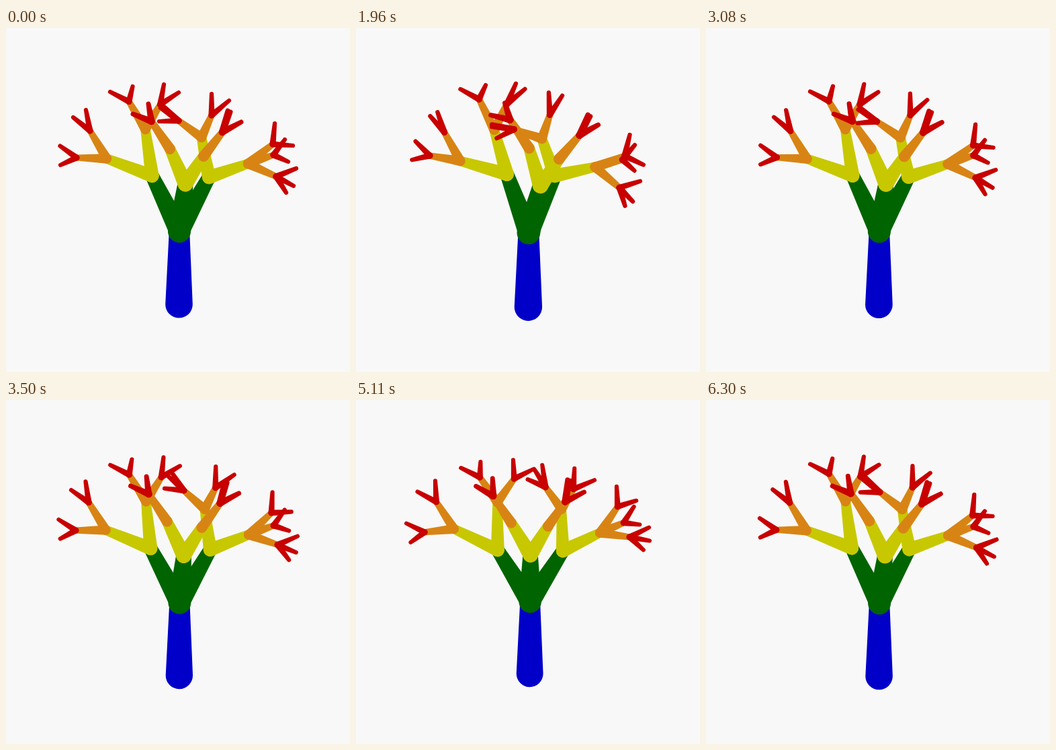
Recreate the animation shown at these times as an HTML page with a canvas. Size 512 by 512 pixels, loop 6.37 s.

```html
<!DOCTYPE html>
<html>
<head>
<meta charset="utf-8">
<style>
html, body { margin: 0; width: 100%; height: 100%; overflow: hidden; background: #f8f8f8; }
canvas { display: block; }
</style>
</head>
<body>
<canvas id="stage" width="512" height="512"></canvas>
<script>
const ctx = document.getElementById('stage').getContext('2d');
const STEP = 70, STEPS = 91;
const COLORS = ['#0000c8', '#006400', '#c8c800', '#d88414', '#c80000'];
const RADII = [20.3, 15.2, 10.2, 7.2, 4.6, 3.1];

// A branch tip at rest, how far it swings (degrees) and lengthens (ratio), and its children.
const tip = (x, y, swing, grow, ...kids) => ({ x, y, swing: swing * Math.PI / 180, grow, kids, bulk: 1 });

const left = tip(217.5, 220, 6.3, .012,
  tip(150, 194.5, -5.3, 0,
    tip(105, 193, 8.6, .025, tip(80.5, 175.5, 10.3, 0), tip(81, 204, 12.2, .03)),
    tip(125, 153, 2.2, .01, tip(100, 133, 10.7, 0), tip(119, 122, -8.4, 0))),
  tip(207.5, 151, -8.35, -.018,
    tip(183, 109.5, 4.6, .06, tip(155, 95, 1, 0), tip(188.5, 87, 12, 0)),
    tip(229.5, 114, -4.9, 0, tip(235, 84, 14, .09), tip(257, 96, -7, .06))));

const middle = tip(267, 232, 7.3, .02,
  tip(244, 180, 7.5, .024,
    tip(216.5, 139, 0, .03, tip(189, 128, -8.6, 0), tip(212, 113, -8, 0))),
  tip(294, 191, 1.8, -.018,
    tip(322, 155, 3.1, .025, tip(330, 123, 8.5, 0), tip(334, 125, 8.5, 0), tip(350, 140, -1, 0))));

const right = tip(302, 222, -4.3, .02,
  tip(291, 163, -9.3, -.033,
    tip(257, 138, -18.8, .04, tip(230, 119, 24 * -1, .03), tip(233, 115, -40, 0), tip(228, 139, -27, 0)),
    tip(306, 130, -6.5, .04, tip(306, 98, -3, .04), tip(332, 108, -18, 0))),
  tip(360, 202, 7.3, 0,
    tip(397, 173, 18.8, 0, tip(400, 142, 8.7, .04), tip(427, 175, 23, .03)),
    tip(398, 189, 4.3, .05, tip(415, 166, 4, 0), tip(420, 199, 19, 0)),
    tip(402, 221, 17.1, .035, tip(432, 209, 4.8, 0), tip(428, 235, 19, -.03), tip(417, 245, 16, 0))));

const crown = { x: 258, y: 302.5, kids: [left, middle, right], bulk: 1 };

// The middle limb leans towards the viewer and looks thicker.
(function thicken(node) {
  node.bulk = 1.12;
  node.kids.forEach(thicken);
})(middle);

function limb(a, b, level, scale) {
  const r0 = RADII[level] * scale, r1 = RADII[level + 1] * scale;
  const angle = Math.atan2(b.y - a.y, b.x - a.x);
  ctx.fillStyle = COLORS[level];
  ctx.beginPath();
  ctx.arc(a.x, a.y, r0, angle + Math.PI / 2, angle - Math.PI / 2);
  ctx.arc(b.x, b.y, r1, angle - Math.PI / 2, angle + Math.PI / 2);
  ctx.fill();
}

function draw(sway) {
  const zoom = 1 + .02 * sway;
  const base = { x: 257.5 - 1.2 * sway, y: 411.3 + 4.2 * sway };
  const top = { x: crown.x - 1.2 * sway, y: crown.y + 2.4 * sway };
  ctx.fillStyle = '#f8f8f8';
  ctx.fillRect(0, 0, 512, 512);
  limb(base, top, 0, zoom);

  // One level at a time, so thinner branches always lie on top.
  let row = [{ node: crown, at: top }];
  for (let level = 1; level < COLORS.length; level++) {
    row = row.flatMap(({ node, at }) => node.kids.map(kid => {
      const dx = kid.x - node.x, dy = kid.y - node.y;
      const turn = kid.swing * sway, stretch = 1 + kid.grow * sway;
      const c = Math.cos(turn) * stretch, s = Math.sin(turn) * stretch;
      const end = { x: at.x + dx * c - dy * s, y: at.y + dx * s + dy * c };
      limb(at, end, level, zoom * kid.bulk);
      return { node: kid, at: end };
    }));
  }
}

function frame() {
  const step = Math.floor(performance.now() / STEP) % STEPS;
  draw(Math.sin(2 * Math.PI * step / STEPS));
  requestAnimationFrame(frame);
}
frame();
</script>
</body>
</html>
```
